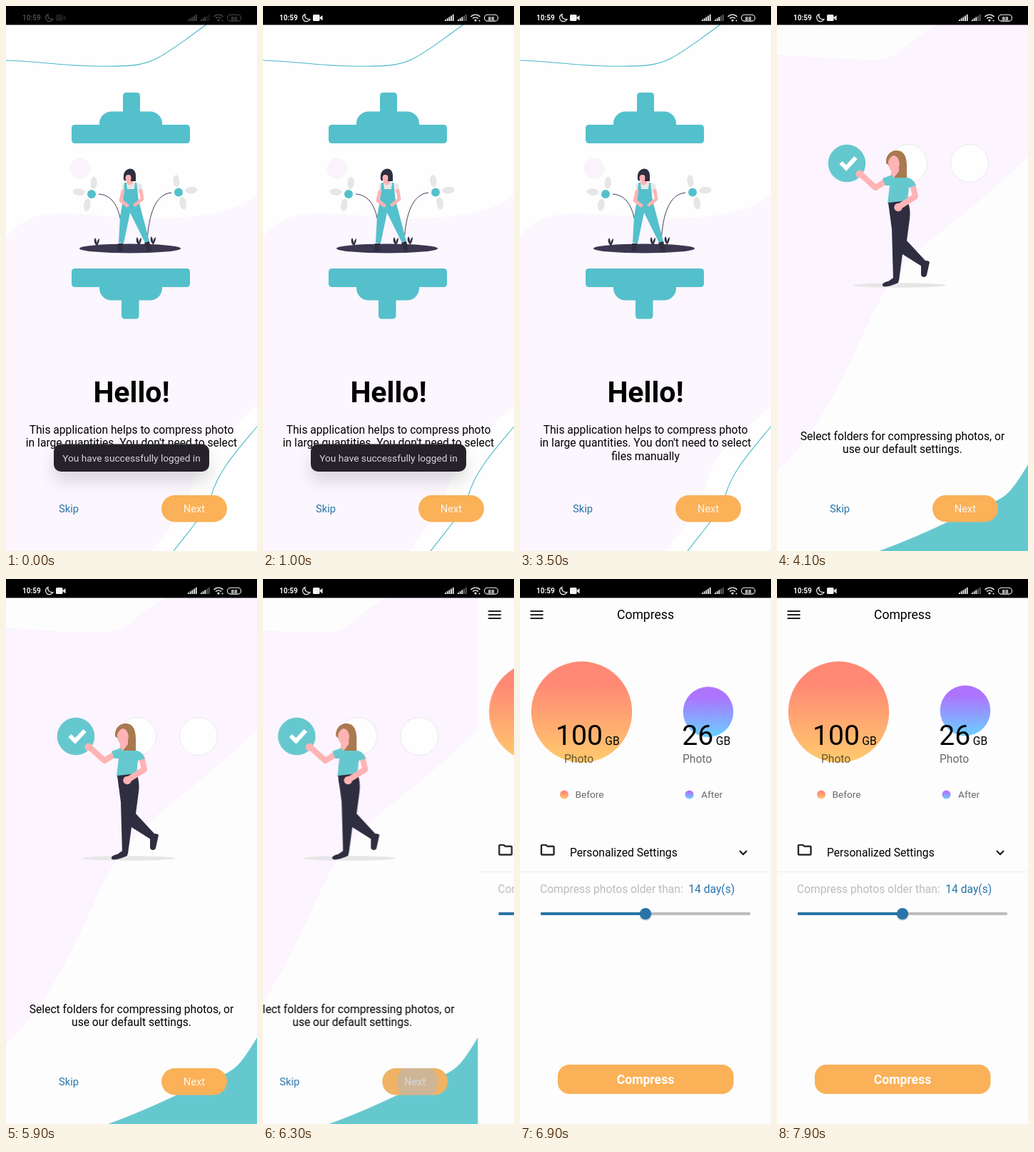
An HTML page that plays this animation: 352x762 px, repeating every 8000 ms.

```html
<!DOCTYPE html>
<html lang="en">
<head>
<meta charset="utf-8">
<title>Photo compressor intro</title>
<style>
html, body { margin: 0; width: 100%; height: 100%; overflow: hidden; background: #fefefe; }
svg { display: block; width: 352px; height: 762px; font-family: Roboto, "Noto Sans", sans-serif; font-size: 15.64px; }
.mid { text-anchor: middle; }
.teal { fill: #54c0cb; }
.mint { fill: #66c8cf; }
.skin { fill: #feb3b5; }
.dark { fill: #2f2e41; }
.limb { fill: none; stroke: #feb3b5; stroke-linecap: round; stroke-linejoin: round; }
.wire { fill: none; stroke: #4bb8c8; stroke-width: 1.1; }
.stem { fill: none; stroke: #3f3d56; stroke-width: 1; }
.petal { fill: #e6e6e6; }
.soft { fill: #6a6a6a; }
.press { fill: #a0bbd8; }
#toast { filter: drop-shadow(0 14px 11px rgba(0, 0, 0, .13)); }
</style>
</head>
<body>
<svg viewBox="0 0 352 762">
  <defs>
    <linearGradient id="warm" x2="0" y2="1">
      <stop offset=".22" stop-color="#ff8974"/><stop offset="1" stop-color="#ffcb6e"/>
    </linearGradient>
    <linearGradient id="cool" x2="0" y2="1">
      <stop offset=".2" stop-color="#ae74fe"/><stop offset=".95" stop-color="#6ccbff"/>
    </linearGradient>
    <clipPath id="pill"><rect x="218" y="684" width="92" height="37.5" rx="18.7"/></clipPath>
    <clipPath id="page"><rect width="352" height="762"/></clipPath>
    <g id="flower">
      <ellipse class="petal" cx="2" cy="-16" rx="4.6" ry="8.5" transform="rotate(4)"/>
      <ellipse class="petal" cx="-18" cy="-2" rx="8.5" ry="4.8" transform="rotate(3)"/>
      <ellipse class="petal" cx="-4" cy="16" rx="4.8" ry="8.8" transform="rotate(8)"/>
      <circle class="teal" r="6"/>
    </g>
    <path id="sprout" class="dark" d="M0 11C-4 7 -4 3 -2 0C0 3 0 6 0 8C1 4 2 2 4 1C4 6 2 9 1 11Z"/>
    <g id="jaw" class="teal">
      <rect x="92" y="166" width="166" height="26" rx="4.5"/>
      <path d="M131 170V164A17 17 0 0 1 148 147.500H202A17 17 0 0 1 219 164V170Z"/>
    </g>
  </defs>

  <g id="strip">
    <g id="hello" clip-path="url(#page)">
      <rect width="352" height="762" fill="#fefefe"/>
      <path fill="#fcf6fe" d="M0 323C22 297 45 289 85 290C130 291 165 297 205 297C270 296 325 290 352 262V558C318 594 280 612 264 660C254 694 232 728 205 762H0Z"/>
      <path class="wire" d="M0 76C40 77 75 83 120 84C170 85 190 84 210 74C235 61 258 42 281 26"/>
      <path class="wire" d="M352 588C322 624 298 650 288 684C282 706 266 722 235 762"/>
      <rect class="teal" x="164" y="121" width="24" height="34" rx="4.500"/>
      <use href="#jaw"/>
      <use href="#jaw" transform="matrix(1 0 0 -1 0 559)"/>
      <rect class="teal" x="162" y="404" width="24.500" height="33.500" rx="4.500"/>

      <circle cx="104" cy="227" r="14.500" fill="#faf3fc"/>
      <ellipse cx="174" cy="339" rx="71" ry="6.500" fill="#3b3750"/>
      <path class="stem" d="M130 263C151 264 164 285 163 334M232 261C209 263 200 292 198 330"/>
      <use href="#flower" x="120" y="263"/>
      <use href="#flower" transform="matrix(-1 0 0 1 242 260.500)"/>
      <use href="#sprout" x="127" y="324"/>
      <use href="#sprout" x="186" y="323"/>
      <use href="#sprout" x="206" y="322"/>
      <path fill="#e8e8e8" d="M162 250L170 246H179L190 249L192 261L164 262Z"/>
      <path class="skin" d="M169 240H178V248L173 251L169 247Z"/>
      <path class="dark" d="M165 243C163 224 182 223 182 237V245H175V237L168 238V245Z"/>
      <ellipse class="skin" cx="171.500" cy="240.500" rx="4" ry="4.800"/>
      <path class="dark" d="M165 240C164 225 181 225 181 236L166 236Z"/>
      <path class="teal" d="M166 247H169L170 256H180L181 247H183L186 272L201 329L195 331L174 289L165 332L158 331L160 294L164 272Z"/>
      <path class="limb" stroke-width="4.800" d="M164 259L161 272L170 279M189 258L191 270L181 278"/>
      <path class="dark" d="M157 332H164L163 343H156ZM194 331L201 329L204 341L198 343Z"/>

      <text class="mid" x="176" y="554" font-size="41" font-weight="700">Hello!</text>
      <g class="mid">
        <text x="176" y="597.500">This application helps to compress photo</text>
        <text x="176" y="616">in large quantities. You don't need to select</text>
        <text x="176" y="634.500">files manually</text>
      </g>
      <g class="nav"></g>
    </g>

    <g id="folders" transform="translate(352)">
     <g clip-path="url(#page)">
      <rect width="352" height="762" fill="#fdfdfe"/>
      <path fill="#fcf4fe" d="M0 68C45 71 95 75 140 75C172 74 180 50 225 26H352V210C310 252 265 288 228 317C180 356 156 388 138 422C104 492 66 592 0 650Z"/>
      <path class="mint" d="M352 641C331 676 322 687 300 695C250 715 200 742 143 762H352Z"/>
      <circle class="mint" cx="98" cy="220" r="26.300"/>
      <path d="M89.500 219L97 226.500L110.500 212" fill="none" stroke="#fff" stroke-width="6"/>
      <g fill="#fefefe" stroke="#ebe8ee"><circle cx="184" cy="220" r="26.500"/><circle cx="270" cy="220" r="26.500"/></g>

      <ellipse cx="172" cy="390.500" rx="65" ry="3.200" fill="#e6e6e6"/>
      <path fill="#a9794f" d="M153 219C153 207 161 202 168 202C178 202 182 211 182 223V241H162V230Z"/>
      <path class="skin" d="M160 226H171V243L160 246Z"/>
      <ellipse class="skin" cx="164" cy="219" rx="8" ry="12.500"/>
      <path fill="#a9794f" d="M153 221C152 206 162 201 171 203C180 206 182 216 182 240H164L171 231C174 221 171 209 163 209C158 211 157 217 153 221Z"/>
      <path class="limb" stroke-width="8" d="M117 235L138 254L151 246M190 249L194 266L172 280"/>
      <circle class="skin" cx="116" cy="235" r="5.500"/>
      <path class="mint" d="M148 241L161 236L163 240H182C189 240 192 245 195 251L185 254L183 273L155 276L158 251L152 251Z"/>
      <path class="dark" d="M156 275L183 272C187 282 187 291 186 298L182 328L208 356L203 364L176 347L171 384L163 383L161 312Z"/>
      <path class="dark" d="M202 360C205 355 212 355 214 358L210 376C209 380 203 380 202 376ZM163 380L171 382L170 387C163 390 156 393 149 392C146 390 149 386 156 385Z"/>
      <path class="limb" stroke-width="8" d="M193 267L172 280"/>
      <circle class="skin" cx="170" cy="281.500" r="5.700"/>

      <g class="mid">
        <text x="176" y="606.500">Select folders for compressing photos, or</text>
        <text x="176" y="625">use our default settings.</text>
      </g>
      <g class="nav"></g>
     </g>
    </g>

    <g transform="translate(704)">
      <rect width="352" height="762" fill="#fdfdfe"/>
      <path d="M14.500 45H32.500M14.500 50H32.500M14.500 55H32.500" stroke="#222" stroke-width="2"/>
      <text class="mid" x="176" y="56" font-size="17.600">Compress</text>
      <circle cx="86.500" cy="186" r="70.700" fill="url(#warm)"/>
      <circle id="after" cx="264" cy="186" r="35.300" fill="url(#cool)"/>
      <g font-size="39.100"><text x="50" y="232">100</text><text x="227.300" y="232">26</text></g>
      <text x="119.300" y="232">GB</text>
      <text x="274.800" y="232">GB</text>
      <g fill="#000" fill-opacity=".58"><text x="62" y="256.500">Photo</text><text x="228" y="256.500">Photo</text></g>
      <circle cx="62" cy="301.500" r="6" fill="url(#warm)"/>
      <circle cx="237.500" cy="301.500" r="6" fill="url(#cool)"/>
      <g class="soft" font-size="13.700"><text x="77.500" y="306">Before</text><text x="254" y="306">After</text></g>

      <path fill="#1c1c1e" stroke="#1c1c1e" stroke-width=".3" transform="translate(27 367) scale(.978)" d="M9.200 6L11.200 8H20V18H4V6ZM10 4H4C2.900 4 2 4.900 2 6V18C2 19.100 2.900 20 4 20H20C21.100 20 22 19.100 22 18V8C22 6.900 21.100 6 20 6H12Z" fill-rule="evenodd"/>
      <text x="70" y="387.500">Personalized Settings</text>
      <path d="M308 380L313 385L318 380" fill="none" stroke="#111" stroke-width="2"/>
      <path d="M0 409.500H352" stroke="#efeff0"/>
      <text x="28" y="438.500" fill="#bcbcbc">Compress photos older than:</text>
      <text x="236.300" y="438.500" fill="#2874a8">14 day(s)</text>
      <rect x="29" y="466" width="294" height="4" rx="1" fill="#bcbebe"/>
      <rect x="29" y="466" width="147" height="4" rx="1" fill="#2874a8"/>
      <circle cx="176" cy="469.300" r="8.500" fill="#000" opacity=".2"/>
      <circle cx="176" cy="468" r="8" fill="#2874a8"/>
      <rect x="53" y="679" width="246.500" height="41" rx="16" fill="#fab158"/>
      <text class="mid" x="176" y="706" font-size="17.600" font-weight="700" fill="#fff">Compress</text>
    </g>
  </g>

  <g id="toast">
    <rect x="67" y="612.500" width="218" height="38.500" rx="10" fill="#25222a"/>
    <text class="mid" x="176" y="637" font-size="13.700" fill="#d8d6da">You have successfully logged in</text>
  </g>

  <rect width="352" height="26.400" fill="#000"/>
  <g id="status" fill="#f4f4f4">
    <text x="23" y="20.300" font-size="10" font-weight="700">10:59</text>
    <path d="M59 11.500C55 13 54.500 18 57.500 20.500C60 22.500 64.500 21.500 66 18.500C61 19 57.500 16 59 11.500Z" fill="none" stroke="#f4f4f4" stroke-width="1.200"/>
    <g id="cam"><rect x="70" y="12" width="9.500" height="9" rx="1.500"/><path d="M79 16.500L83.500 13V20.500Z"/></g>
    <g id="bars"></g>
    <g fill="none" stroke="#f4f4f4" stroke-width="1.400">
      <path d="M291.500 15C295 11.200 301 11.200 304.500 15M294 17.600C296.300 15.300 299.700 15.300 302 17.600"/>
      <rect x="310.500" y="12.300" width="19" height="8.800" rx="4.400" stroke-width="1.100"/>
    </g>
    <circle cx="298" cy="20" r="1.600"/>
    <circle cx="303.500" cy="20.500" r="1"/>
    <text class="mid" x="320" y="19.600" font-size="8" font-weight="700">88</text>
  </g>
</svg>
<script>
const LOOP = 8000;
const $ = s => document.querySelector(s);

// Bottom buttons shared by both intro pages
document.querySelectorAll('.nav').forEach(nav => nav.innerHTML = `
  <text class="mid" x="88" y="708" font-size="14.7" fill="#2874a8">Skip</text>
  <rect x="218" y="684" width="92" height="37.5" rx="18.7" fill="#fab158"/>
  <text class="mid" x="264" y="708" font-size="14.7" fill="#fff6ea">Next</text>
  <g clip-path="url(#pill)">
    <rect class="press glow" x="218" y="684" width="92" height="38" opacity="0"/>
    <g transform="translate(267 703)"><circle class="press ripple" r="28" fill-opacity=".42"/></g>
  </g>`);

// Signal strength bars
$('#bars').innerHTML = [255, 273].map((x, n) => [0, 1, 2, 3, 4].map(i => {
  const h = 2 + i * 1.8, dim = n && i > 2 ? .4 : 1;
  return `<rect x="${x + i * 2.7}" y="${21 - h}" width="1.8" height="${h}" opacity="${dim}"/>`;
}).join('')).join('');

// steps: [ms, value, easing to the next step]
function play(el, prop, steps) {
  const all = [[0, steps[0][1]], ...steps, [LOOP, steps[steps.length - 1][1]]];
  el.animate(all.map(([t, value, easing = 'linear']) => ({ offset: t / LOOP, [prop]: value, easing })),
    { duration: LOOP, iterations: Infinity });
}

const slides = [3612, 6186], slideTime = 436;
const x = n => `translateX(${-352 * n}px)`;
play($('#strip'), 'transform', slides.flatMap((t, n) => [[t, x(n), 'ease-in-out'], [t + slideTime, x(n + 1)]]));

['#hello', '#folders'].forEach((id, n) => {
  const t = slides[n];
  play($(id + ' .glow'), 'opacity', [[t - 60, 0], [t + 60, .1], [t + 400, .1], [t + 500, 0]]);
  play($(id + ' .ripple'), 'transform', [[t - 30, 'scale(0)'], [t + 114, 'scale(1)'], [t + 290, 'scale(2.4)']]);
});

play($('#status'), 'opacity', [[50, .3], [200, .6], [400, .6], [600, 1]]);
play($('#cam'), 'opacity', [[50, .4], [600, 1]]);
play($('#toast'), 'opacity', [[1000, 1], [1300, 0]]);
play($('#after'), 'transform', [[6600, 'translateY(0)', 'ease-in-out'], [7900, 'translateY(-2px)']]);
</script>
</body>
</html>
```
